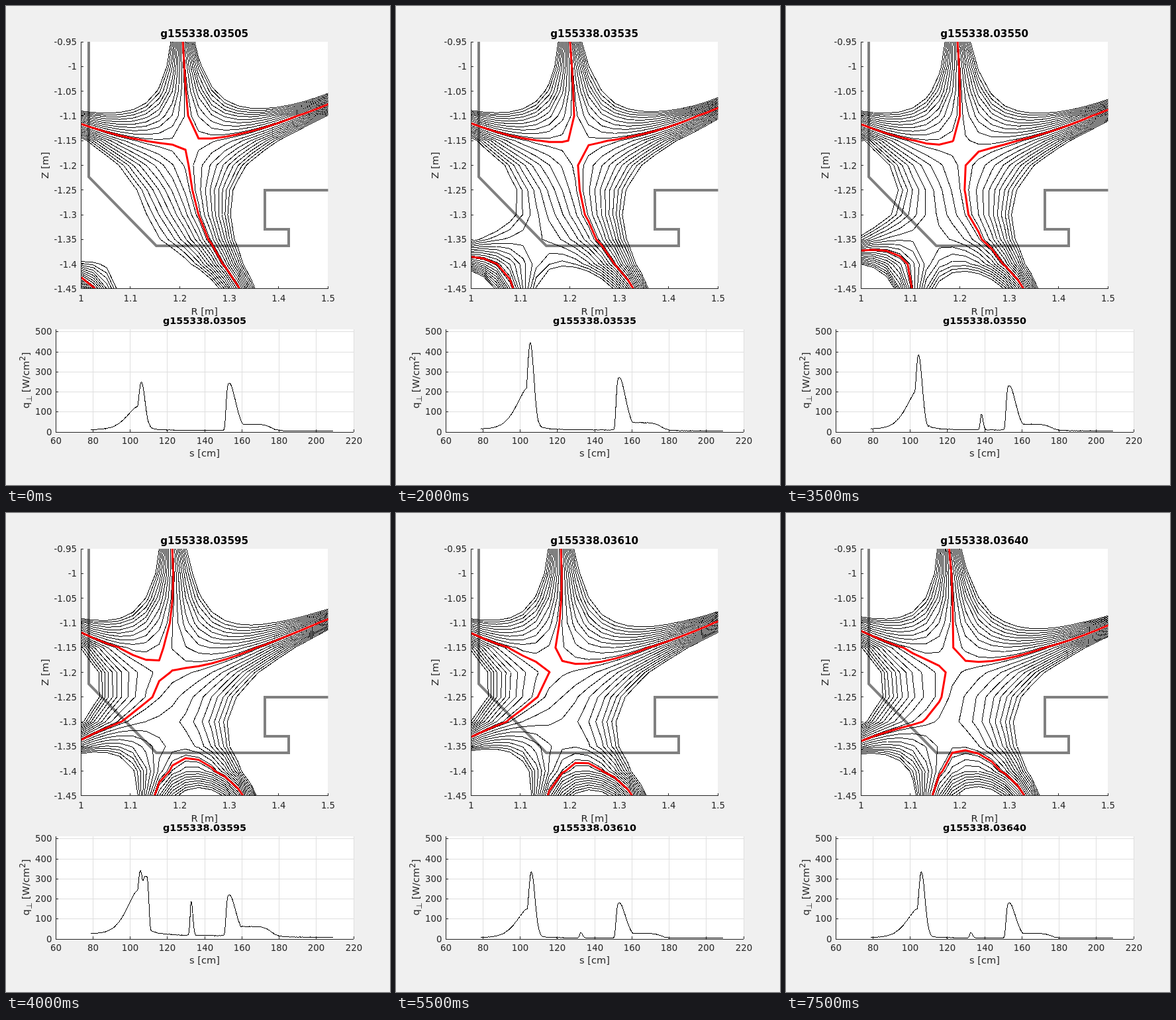
Recreate the animation shown at these times as an HTML page. Size 580 by 723 pixels, loop 8 s.

```html
<!DOCTYPE html>
<html lang="en">
<head>
<meta charset="utf-8">
<title>Flux contours and heat flux</title>
<style>
  html, body { margin: 0; width: 100%; height: 100%; overflow: hidden; background: #f0f0f0; }
  svg { display: block; width: 580px; height: 723px; }
  text { font-family: "DejaVu Sans", sans-serif; font-size: 13.33px; fill: #262626; }
  .label { font-size: 14.67px; text-anchor: middle; }
  .small { font-size: 11.7px; }
  .title { font-weight: bold; fill: #000; text-anchor: middle; }
  #top { font-size: 15.2px; }
  #low { font-size: 14.4px; }
  path { fill: none; }
  .axis { stroke: #262626; stroke-width: 1; }
  .grid { stroke: #dfdfdf; stroke-width: 1; }
  .wall { stroke: #808080; stroke-width: 4; }
  .line { stroke: #000; stroke-width: 1; shape-rendering: crispEdges; }
  .edge { stroke: #f00; stroke-width: 3; stroke-linecap: round; }
</style>
</head>
<body>
<svg viewBox="0 0 580 723">
  <clipPath id="box"><rect x="113" y="54" width="373.5" height="373"/></clipPath>
  <rect x="113" y="54" width="373" height="373" fill="#fff"/>
  <rect x="75" y="488" width="450" height="155" fill="#fff"/>
  <g clip-path="url(#box)">
    <path class="wall" d="M125 50V258L227 362H427V337H391V278H490"/>
    <path class="line" id="flux"/>
    <path class="edge" id="edge"/>
  </g>
  <path class="grid" id="grid"/>
  <path class="axis" id="axis"/>
  <path class="line" id="heat"/>
  <g id="ticks"></g>
  <text class="title" id="top" x="299.7" y="47"></text>
  <text class="title" id="low" x="300" y="480"></text>
  <text class="label" x="299.7" y="466">R [m]</text>
  <text class="label" x="300" y="680">s [cm]</text>
  <text class="label" transform="translate(64 240.5) rotate(-90)">Z [m]</text>
  <text class="label" transform="translate(35 565) rotate(-90)">q<tspan class="small" dy="4">⊥</tspan><tspan dy="-4"> [W/cm</tspan><tspan class="small" dy="-6">2</tspan><tspan dy="6">]</tspan></text>
</svg>
<script>
const $ = id => document.getElementById(id);

// ---- flux: a near-harmonic field on a coarse grid, fitted to landmarks ----
const NX = 20, NY = 11, X0 = 112.5, Y0 = 54, DX = 19.82, DY = 37.3;

function terms(x, y) {
  const u = (x - 290) / 190, v = (240 - y) / 190, r2 = u * u + v * v;
  const root = Math.sqrt(1 + (x - 113) / 746);
  const out = [root];
  let re = 1, im = 0;
  for (let n = 1; n <= 6; n++) {
    [re, im] = [re * u - im * v, re * v + im * u];
    out.push(re * root, im * root);
  }
  // weak current terms and two coils below the plot
  out.push(r2, r2 * u, r2 * v);
  for (const [cx, cy] of [[113, 477], [400, 520]])
    out.push(Math.log(Math.hypot(x - cx, y - cy) / 190) * root);
  return out;
}

// high orders are held back
const ridge = terms(0, 0).map((_, i) =>
  i < 13 ? 2e-5 * Math.ceil(i / 2) ** 4 + 1e-7 : i < 16 ? 0.01 : 0.005);

const nodes = Array.from({ length: NX * NY }, (_, k) =>
  terms(X0 + k % NX * DX, Y0 + Math.floor(k / NX) * DY));

const dot = (a, b) => a.reduce((s, v, i) => s + v * b[i], 0);
const mix = (a, b, f) => a + (b - a) * f;
const clamp = (v, lo, hi) => Math.max(lo, Math.min(hi, v));

function cellTerms(x, y) {
  const gx = (x - X0) / DX, gy = (y - Y0) / DY;
  const i = clamp(Math.floor(gx), 0, NX - 2), j = clamp(Math.floor(gy), 0, NY - 2);
  const a = gx - i, b = gy - j, k = j * NX + i;
  return nodes[k].map((v, t) => mix(
    mix(v, nodes[k + 1][t], a), mix(nodes[k + NX][t], nodes[k + NX + 1][t], a), b));
}

function solve(A, b) {
  const n = b.length;
  for (let c = 0; c < n; c++) {
    let p = c;
    for (let r = c + 1; r < n; r++) if (Math.abs(A[r][c]) > Math.abs(A[p][c])) p = r;
    [A[c], A[p]] = [A[p], A[c]];
    [b[c], b[p]] = [b[p], b[c]];
    for (let r = c + 1; r < n; r++) {
      const f = A[r][c] / A[c][c];
      for (let k = c; k < n; k++) A[r][k] -= f * A[c][k];
      b[r] -= f * b[c];
    }
  }
  for (let c = n - 1; c >= 0; c--) {
    for (let k = c + 1; k < n; k++) b[c] -= A[c][k] * b[k];
    b[c] /= A[c][c];
  }
  return b;
}

function fit(rows) {
  const A = ridge.map((r, i) => ridge.map((_, j) => i === j ? r : 0));
  const b = ridge.map(() => 0);
  for (const { t, value, w } of rows)
    t.forEach((ti, i) => {
      b[i] += w * w * ti * value;
      t.forEach((tj, j) => { A[i][j] += w * w * ti * tj; });
    });
  return solve(A, b);
}

// Landmarks, in pixels: where the separatrix leaves each side (top, right,
// bottom, left, low), how it and the outer lines bend, and the saddle.
function landmarks(m) {
  const { top, right, bottom, left, low, neck, waist, hip, crown, leg, dip } = m;
  const [sx, sy] = m.saddle;
  const foot = 136 + (413 - low) * 1.26;
  const knee = Math.min(330, 205 + neck / 2);
  return {
    0: [
      [top, 54], [mix(top, sx, 0.25), 128],
      [486, right], [450, mix(right, sy, 0.25)], [372, mix(right, sy, 0.73)], [330, mix(right, sy, 0.94)],
      [113, left], [150, left + 15], [192, left + 17 + 0.35 * (sy - left)],
      [neck, 278], [303, leg], [knee, 390], [bottom, 427], [113, low], [foot, 427]
    ],
    1: [
      [top - 18, 54], [211, 128 + (top - 250) * 1.1], [172, 159], [150, 162], [113, 159],
      [bottom + 20, 427], [hip + 9, 352], [hip, 315], [hip + 5, 278], [420, right + 48], [486, right + 19],
      [113, low + 22], [foot - 26, 427]
    ],
    "-1": [
      [top + 20, 54], [312, crown - 29], [335, crown - 12], [390, crown], [486, right - 16],
      [113, left + 23], [waist, 262], [113, low * 0.957 - 12], [271, dip]
    ]
  };
}

function makeState(m) {
  const rows = [];
  for (const [value, points] of Object.entries(landmarks(m)))
    for (const [x, y] of points) rows.push({ x, y, value: +value, w: 1, t: cellTerms(x, y) });
  const hold = (x, y, value, w) => ({ value, w, t: cellTerms(x, y) });
  const fixed = [
    hold(...m.saddle, 15),
    hold(120, 60, 7, 0.08), hold(480, 60, -6, 0.08), hold(470, 420, 6, 0.08), hold(450, 320, 5, 0.08)
  ];
  let c = fit(rows.concat(fixed));
  // weigh by slope so that errors count as distance on screen
  for (let pass = 0; pass < 2; pass++) {
    for (const r of rows) {
      const at = (dx, dy) => dot(c, terms(r.x + dx, r.y + dy));
      const slope = Math.hypot(at(4, 0) - at(-4, 0), at(0, 4) - at(0, -4)) / 8;
      r.w = clamp(0.05 / slope, 0.5, 4);
    }
    c = fit(rows.concat(fixed));
  }
  return { shot: m.shot, field: nodes.map(t => dot(c, t)) };
}

const states = [
  { shot: 3505, top: 267, right: 148, bottom: 354, left: 176, low: 413, neck: 282,
    waist: 190, hip: 338, crown: 155, leg: 350, dip: 381, saddle: [281, 203, 0.02] },
  { shot: 3535, top: 263, right: 154, bottom: 359, left: 175, low: 380, neck: 275,
    waist: 180, hip: 342, crown: 161, leg: 352, dip: 394, saddle: [278, 207, -0.01] },
  { shot: 3545, top: 260, right: 156, bottom: 359, left: 177, low: 373, neck: 270,
    waist: 173, hip: 341, crown: 162, leg: 356, dip: 398, saddle: [266, 214, -0.02] },
  { shot: 3595, top: 251, right: 159, bottom: 357, left: 181, low: 342, neck: 227,
    waist: 143, hip: 333, crown: 173, leg: 380, dip: 418, saddle: [240, 232, -0.01] },
  { shot: 3605, top: 249, right: 161, bottom: 356, left: 182, low: 338, neck: 218,
    waist: 140, hip: 332, crown: 175, leg: 384, dip: 422, saddle: [240, 225, 0.02] },
  { shot: 3625, top: 248, right: 169, bottom: 356, left: 182, low: 337, neck: 216,
    waist: 140, hip: 332, crown: 183, leg: 385, dip: 424, saddle: [232, 238, -0.01] },
  { shot: 3640, top: 247, right: 170, bottom: 360, left: 177, low: 344, neck: 237,
    waist: 146, hip: 345, crown: 180, leg: 370, dip: 415, saddle: [250, 224, 0.02] }
].map(makeState);

function fieldAt(shot) {
  const k = Math.max(1, states.findIndex(s => s.shot >= shot));
  const a = states[k - 1], b = states[k];
  const f = (shot - a.shot) / (b.shot - a.shot);
  return a.field.map((v, i) => mix(v, b.field[i], f));
}

function contour(field, level) {
  let d = "";
  for (let j = 0; j < NY - 1; j++)
    for (let i = 0; i < NX - 1; i++) {
      const k = j * NX + i;
      const q = [k, k + 1, k + NX + 1, k + NX].map(n => field[n] - level);
      const at = [[i, j], [i + 1, j], [i + 1, j + 1], [i, j + 1]];
      const hit = [];
      for (let e = 0; e < 4; e++) {
        const n = (e + 1) % 4;
        if (q[e] > 0 === q[n] > 0) continue;
        const f = q[e] / (q[e] - q[n]);
        const x = X0 + DX * mix(at[e][0], at[n][0], f);
        const y = Y0 + DY * mix(at[e][1], at[n][1], f);
        hit.push(x.toFixed(1) + " " + y.toFixed(1));
      }
      const join = (a, b) => { d += `M${hit[a]}L${hit[b]}`; };
      if (hit.length === 2) join(0, 1);
      if (hit.length === 4) {
        const mid = q[0] + q[1] + q[2] + q[3];
        if (mid > 0 === q[0] > 0) { join(0, 1); join(2, 3); }
        else { join(3, 0); join(1, 2); }
      }
    }
  return d;
}

// ---- heat flux over s [cm], q [W/cm2]: lopsided bumps on a falling base ----
const sx = s => 75 + (s - 60) * 2.8125;
const qy = q => 643 - q * 0.3025;

function bump(s, centre, height, before, after, power = 2) {
  const d = s - centre;
  return height * Math.exp(-((Math.abs(d) / (d < 0 ? before : after)) ** power));
}

function heatCurve({ base, ramp, peak, twin = 0, mid, outer, shelf }) {
  let seed = 7, d = "";
  const noise = () => (seed = seed * 16807 % 2147483647) / 2147483647 - 0.5;
  for (let s = 79; s <= 209; s += 0.35) {
    const floor = s < 110 ? base
      : base * (0.3 + 0.3 / (1 + Math.exp((s - 178) / 4)) + Math.exp((110 - s) / 8));
    const q = floor + 2 * noise() + Math.max(
      bump(s, 104, ramp - base, 8.5, 3, 1.6),
      bump(s, peak[0], peak[1] - base, 2.2, 2.8),
      bump(s, 108.7, twin, 4, 1.6, 3),
      bump(s, mid[0], mid[1], 0.8, 1.2),
      bump(s, 153.4, outer, 2.1, 4.8, s < 153.4 ? 4 : 1.8),
      s > 158 ? shelf / (1 + Math.exp((s - 175.5) / 1.8)) : 0);
    d += (d ? "L" : "M") + sx(s).toFixed(1) + " " + (qy(Math.max(2, q)) - 0.5).toFixed(1);
  }
  return d;
}

const heats = [
  { until: 3505, base: 10, ramp: 125, peak: [106, 248], mid: [138, 0], outer: 236, shelf: 31 },
  { until: 3540, base: 14, ramp: 220, peak: [105.4, 445], mid: [138, 0], outer: 262, shelf: 37 },
  { until: 3550, base: 14, ramp: 210, peak: [104.5, 383], mid: [138.3, 80], outer: 222, shelf: 29 },
  { until: 3605, base: 25, ramp: 240, peak: [105.5, 340], twin: 287, mid: [132.8, 170], outer: 204, shelf: 46 },
  { until: 3640, base: 6, ramp: 150, peak: [106, 333], mid: [132.6, 27], outer: 175, shelf: 23 }
].map(h => ({ until: h.until, path: heatCurve(h) }));

// ---- axes ----
let axis = "M113.5 54V426.5H486M75.5 488V643.5H525", grid = "";
function tick(text, x, y, anchor) {
  const el = document.createElementNS("http://www.w3.org/2000/svg", "text");
  el.setAttribute("x", x);
  el.setAttribute("y", y);
  el.setAttribute("text-anchor", anchor);
  el.textContent = text;
  $("ticks").append(el);
}
for (let i = 0; i <= 10; i++) {
  const y = 54 + 37.3 * i;
  axis += `M113 ${Math.min(426, Math.floor(y)) + 0.5}h4`;
  tick(+(-0.95 - 0.05 * i).toFixed(2), 107, y + 5, "end");
}
for (let i = 0; i <= 5; i++) {
  const x = 113 + 74.6 * i;
  axis += `M${Math.floor(x) + 0.5} 427v-4`;
  tick(+(1 + 0.1 * i).toFixed(1), x + 0.5, 446, "middle");
}
for (let s = 60; s <= 220; s += 20) {
  const x = Math.floor(sx(s)) + 0.5;
  grid += `M${x} 488V643`;
  axis += `M${x} 643v-4`;
  tick(s, x, 661, "middle");
}
for (let q = 0; q <= 500; q += 100) {
  const y = Math.floor(qy(q)) + 0.5;
  grid += `M75 ${y}H525`;
  axis += `M75 ${y}h4`;
  tick(q, 69.5, y + 4.5, "end");
}
$("axis").setAttribute("d", axis);
$("grid").setAttribute("d", grid);

// ---- playback ----
const shots = [3505, 3510, 3520, 3530, 3535, 3540, 3545, 3550,
               3595, 3600, 3605, 3610, 3620, 3625, 3630, 3640];
const steps = shots.map(shot => {
  const field = fieldAt(shot);
  let flux = "";
  for (let k = -19; k <= 19; k += 2) flux += contour(field, k / 19);
  return {
    title: "g155338.0" + shot,
    flux,
    edge: contour(field, 0),
    heat: heats.find(h => shot <= h.until).path
  };
});

let shown = -1;
function draw() {
  const i = Math.floor(performance.now() % 8000 / 500);
  if (i !== shown) {
    shown = i;
    const s = steps[i];
    for (const id of ["flux", "edge", "heat"]) $(id).setAttribute("d", s[id]);
    $("top").textContent = $("low").textContent = s.title;
  }
  requestAnimationFrame(draw);
}
draw();
</script>
</body>
</html>
```
